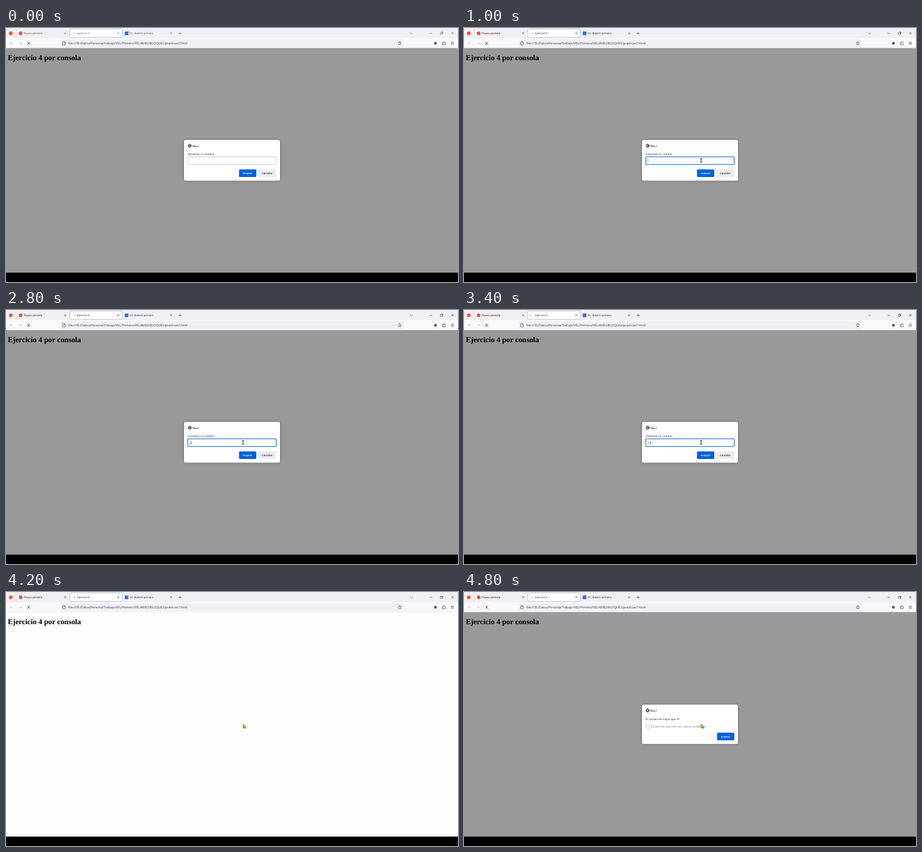
These frames come from a looping animation (800 by 450 pixels, 5000 ms). An HTML page:

```html
<!DOCTYPE html>
<html lang="es">
<head>
<meta charset="utf-8">
<title>Ejercicio 4</title>
<style>
html, body { margin: 0; width: 100%; height: 100%; overflow: hidden; background: #000; }
svg { display: block; width: 100vw; height: 100vh; }
text { font: 4.68px "Open Sans", "Noto Sans", sans-serif; fill: #15141a; text-rendering: geometricPrecision; white-space: pre; }
.url { font-size: 5.5px; fill: #33323a; }
.bold { font-weight: 600; font-size: 4.6px; }
.btn { font-weight: 600; font-size: 4.5px; text-anchor: middle; }
.title { font: bold 13.333px "Liberation Serif", "Times New Roman", serif; fill: #000; }
.white { fill: #fff; }
.line { fill: none; stroke: #44434d; stroke-width: .7; stroke-linecap: round; stroke-linejoin: round; }
.faint { stroke: #c6c5cb; }
.panel { fill: #fff; filter: drop-shadow(0 .8px 2px rgba(0, 0, 0, .35)); }
.blue { fill: #0060df; }

/* Timeline: 1% = 50 ms, every change is a hard cut */
.window, .dim, .prompt, .alert, .focus, .ibeam, .arrow, .two, .one, .caret {
  animation: 5s step-end infinite;
}
.window { animation-name: window; }
.dim { animation-name: dim; }
.prompt { animation-name: prompt; }
.alert { animation-name: alert; }
.focus { animation-name: focus; }
.ibeam { animation-name: ibeam; }
.arrow { animation-name: arrow; }
.two { animation-name: two; }
.one { animation-name: one; }
.caret { animation-name: blink, advance; }

@keyframes window { 0% { opacity: .72 } 20%, 100% { opacity: 1 } }
@keyframes dim { 0% { opacity: 1 } 84% { opacity: 0 } 88%, 100% { opacity: 1 } }
@keyframes prompt { 0% { opacity: 1 } 84%, 100% { opacity: 0 } }
@keyframes alert { 0% { opacity: 0 } 88%, 100% { opacity: 1 } }
@keyframes focus { 0% { opacity: 0 } 20%, 100% { opacity: 1 } }
@keyframes ibeam { 0% { opacity: 0 } 20% { opacity: 1 } 84%, 100% { opacity: 0 } }
@keyframes arrow { 0% { opacity: 0 } 84%, 100% { opacity: 1 } }
@keyframes two { 0% { opacity: 0 } 56%, 100% { opacity: 1 } }
@keyframes one { 0% { opacity: 0 } 68%, 100% { opacity: 1 } }
@keyframes blink {
  0% { opacity: 0 } 20% { opacity: 1 } 28% { opacity: 0 } 40% { opacity: 1 } 52% { opacity: 0 }
  56% { opacity: 1 } 64% { opacity: 0 } 68% { opacity: 1 } 80%, 100% { opacity: 0 }
}
@keyframes advance {
  0% { transform: none } 56% { transform: translateX(2.5px) } 68%, 100% { transform: translateX(5.2px) }
}
</style>
</head>
<body>
<svg viewBox="0 0 800 450" preserveAspectRatio="none">
  <defs>
    <path id="cross" class="line" d="M-1.6-1.6 1.6 1.6M1.6-1.6-1.6 1.6"/>
    <g id="globe" class="line" style="stroke:#26252c;stroke-width:.65">
      <circle r="2.9"/>
      <ellipse rx="1.3" ry="2.9"/>
      <path d="M-2.7-1H2.7M-2.7 1H2.7"/>
    </g>
  </defs>

  <!-- Tab strip -->
  <rect width="800" height="18.5" fill="#f0f0f4"/>
  <path d="M17.7 0V18" stroke="#d0cfd6" stroke-width=".6"/>
  <rect x="113" y="1.6" width="92.7" height="15" rx="1.7" fill="#fff" stroke="#9b9aa8" stroke-width=".6"/>
  <circle cx="8.5" cy="9.5" r="3.2" fill="#f4512c"/>
  <circle cx="26" cy="9.5" r="3.2" fill="#f4512c"/>
  <rect x="210.2" y="6.3" width="6.4" height="6.4" fill="#2a6fdb"/>
  <ellipse id="dot" cx="120.7" cy="9.4" rx=".85" ry=".7" fill="#4b4a55"/>
  <g class="window">
    <text x="32" y="11.2">Nueva pestaña</text>
    <text x="126" y="11.2">Ejercicio 4</text>
    <text x="219.7" y="11.2" style="font-size:4.6px">01. Boletín primero</text>
    <use href="#cross" x="104.8" y="9.3"/>
    <use href="#cross" x="198.8" y="9.3"/>
    <use href="#cross" x="292.3" y="9.3"/>
    <path class="line" d="M305.8 9.5h4.6M308.1 7.2v4.6M715.2 8.3l2.3 2.2 2.3-2.2M750 9.3h4"/>
    <path class="line" d="M769.2 8.1h3.1v3.1h-3.1zM770.2 8v-.9h3.2v3.1h-.9"/>
    <use href="#cross" transform="translate(790.3 9.2) scale(1.1)"/>
  </g>

  <!-- Toolbar -->
  <rect y="18" width="800" height="18" fill="#f9f9fb"/>
  <rect y="35.3" width="800" height=".5" fill="#d6d5db"/>
  <rect x="97" y="20" width="607" height="13.7" rx="1.7" fill="#f0f0f4"/>
  <path class="line faint" d="M12.7 27H7.4M9.7 24.7 7.4 27l2.3 2.3M22.3 27h5.3M25.3 24.7l2.3 2.3-2.3 2.3"/>
  <use href="#cross" transform="translate(40 27) scale(1.4)"/>
  <path class="line" d="M100.8 24.1h2.6l1.6 1.6v4.3h-4.2zM103.2 24.2v1.7h1.7"/>
  <text class="url" x="110.3" y="28.9">file:///D:/Datos/Persona/Trabajo/VEL/Primero/VELAR/B2/BLOQUE2/practicas7.html</text>
  <path class="line" d="M697 24l.9 1.9 2.1.3-1.5 1.5.4 2.1-1.9-1-1.9 1 .4-2.1-1.5-1.5 2.1-.3z"/>
  <circle cx="760" cy="26.9" r="2.5" fill="#5b5a64"/>
  <path class="line" d="M772.6 25.6h1.4v-.8a.8.8 0 0 1 1.7 0v.8h1.6v4.3h-4.7v-1.4h.8a.7.7 0 0 0 0-1.5h-.8z"/>
  <path class="line" d="M787.7 25h4.6M787.7 27h4.6M787.7 29h4.6"/>

  <!-- Page -->
  <rect y="35.8" width="800" height="398" fill="#fffeff"/>
  <rect class="dim" y="35.6" width="800" height="398" fill="#99989b"/>
  <text class="title" x="3.3" y="57">Ejercicio 4 por consola</text>
  <rect y="433.4" width="800" height="16.6" fill="#000"/>

  <!-- Number prompt -->
  <g class="prompt">
    <rect class="panel" x="315" y="198.2" width="170" height="72.2" rx="3.2"/>
    <use href="#globe" x="325.1" y="208.6"/>
    <text class="bold" x="330" y="210.5">file://</text>
    <text x="321.7" y="225.1">Introduce un numero:</text>
    <rect x="321.9" y="228.2" width="156.3" height="13.6" rx="1.6" fill="#fff" stroke="#93929e" stroke-width=".6"/>
    <g class="focus">
      <rect x="321.8" y="228.2" width="156.5" height="13.6" rx="1.6" fill="#fff" stroke="#0061e0" stroke-width="1.1"/>
    </g>
    <text class="two" x="325" y="237.1">2</text>
    <text class="one" x="327.7" y="237.1">1</text>
    <rect class="caret" x="325.3" y="232" width=".5" height="6.2" fill="#15141a"/>
    <rect class="blue" x="412.4" y="250.5" width="30.6" height="13.4" rx="1.7"/>
    <text class="btn white" x="427.7" y="259">Aceptar</text>
    <rect x="446.5" y="250.5" width="31.8" height="13.4" rx="1.7" fill="#ececef"/>
    <text class="btn" x="462.3" y="259">Cancelar</text>
  </g>

  <!-- Result alert -->
  <g class="alert">
    <rect class="panel" x="315" y="199.6" width="170" height="69.6" rx="3.2"/>
    <use href="#globe" x="325.1" y="210"/>
    <text class="bold" x="330" y="211.9">file://</text>
    <text x="321.7" y="226.5">El numero es mayor que 10</text>
    <rect x="321.9" y="235.3" width="6.1" height="6.1" rx=".7" fill="#fbfbfc" stroke="#a9a8b0" stroke-width=".6"/>
    <text x="331" y="240.4" style="fill:#6e6d74">No permitir que este sitio vuelva a preguntar</text>
    <rect class="blue" x="447.8" y="249.3" width="30.6" height="13.4" rx="1.7"/>
    <text class="btn white" x="463.1" y="257.8">Aceptar</text>
  </g>

  <!-- Pointers -->
  <g class="ibeam" fill="none">
    <path d="M417.6 231.5h4M419.6 231.5v6M417.6 237.5h4" stroke="#fff" stroke-width="1.7"/>
    <path d="M417.6 231.5h4M419.6 231.5v6M417.6 237.5h4" stroke="#222" stroke-width="1"/>
  </g>
  <path class="arrow" d="M419.8 234.2v7l1.6-1.4 1.1 2.2 1.2-.6-1-2.1 2-.2z" fill="#d3e414" stroke="#25270a" stroke-width=".7" stroke-linejoin="round"/>
</svg>
<script>
const LOOP = 5000, STEP = 200, SWING = 1050;
const dot = document.getElementById('dot');
let start;

function tick(now) {
  start ??= now;
  const t = Math.floor((now - start) % LOOP / STEP) * STEP;
  const angle = 2 * Math.PI * (t - 300) / SWING;
  dot.setAttribute('cx', 120 - 3 * Math.cos(angle));
  requestAnimationFrame(tick);
}
requestAnimationFrame(tick);
</script>
</body>
</html>
```
